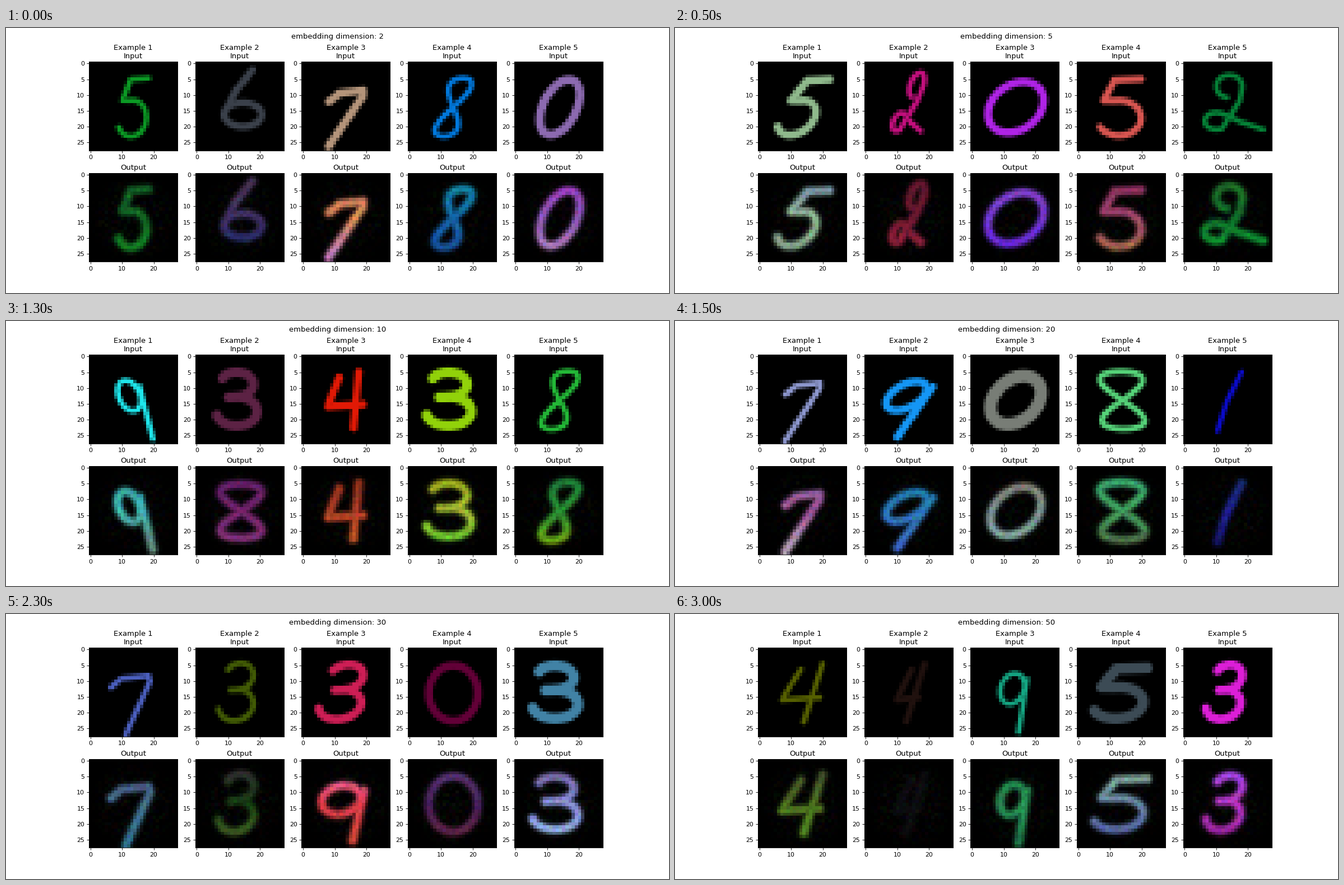
A matplotlib script for the animation above (3500 ms loop, 1183 px wide and 473 px high).

```python
import numpy as np
import matplotlib.pyplot as plt
from matplotlib.animation import FuncAnimation
from matplotlib.colors import to_rgb

WIDTH, HEIGHT, DPI = 1183, 473, 79
SIZE = 28
CENTRE = 13.8
ROWS, COLS = np.mgrid[:SIZE, :SIZE]


def arc(cx, cy, rx, ry, start, end):
    """Elliptic arc, angles in degrees, clockwise from the right."""
    t = np.radians(np.linspace(start, end, 50))
    return np.column_stack([cx + rx * np.cos(t), cy + ry * np.sin(t)])


def path(*pieces):
    """Join points and arcs, then sample the line at even steps."""
    p = np.vstack(pieces)
    run = np.r_[0, np.cumsum(np.hypot(*np.diff(p, axis=0).T))]
    s = np.linspace(0, run[-1], int(80 * run[-1]) + 2)
    return np.column_stack([np.interp(s, run, p[:, 0]), np.interp(s, run, p[:, 1])])


def figure_eight():
    t = np.linspace(0, 2 * np.pi, 120)
    return np.column_stack([0.5 + 0.5 * np.sin(2 * t), 0.5 - 0.5 * np.cos(t)])


# Pen strokes of each digit in a unit box, y downwards.
GLYPHS = {
    "0": [path(arc(.5, .5, .5, .5, -90, 270))],
    "1": [path((1, 0), (.4, .5), (0, 1))],
    "2": [path(arc(.42, .2, .22, .2, 100, 370), (.6, .45),
               arc(.2, .81, .2, .15, 60, 300), (.6, .82), (1, .96))],
    "3": [path(arc(.5, .23, .4, .23, -150, 90)),
          path((.3, .47), arc(.5, .73, .5, .27, -80, 165))],
    "4": [path((.3, .1), (.12, .4), (0, .62), (1, .58)),
          path((.85, 0), (.75, 1))],
    "5": [path((1, .03), (.4, .05), (.15, .4), arc(.5, .7, .5, .3, -100, 150))],
    "6": [path((.75, 0), (.3, .38), arc(.5, .79, .5, .21, 190, -190))],
    "7": [path((0, .2), (.25, .05), (.95, 0), (1, .1), (.45, 1))],
    "8": [path(figure_eight())],
    "9": [path(arc(.45, .26, .45, .26, 0, -360), (.95, .1), (.95, 1))],
}


def distance(digit, aspect, slant, weight):
    """Pixel distances to a digit scaled to a 20 pixel box, centred by mass."""
    p = np.vstack(GLYPHS[digit]) * [aspect, 1]
    p[:, 0] -= slant * p[:, 1]
    p *= (20 - 2 * weight) / np.ptp(p, axis=0).max()
    p += CENTRE - p.mean(axis=0)
    return np.hypot(COLS[..., None] - p[:, 0], ROWS[..., None] - p[:, 1]).min(-1)


def sharp(d, weight, colour):
    return np.clip(weight + 0.5 - d, 0, 1)[..., None] * np.array(to_rgb("#" + colour))


def blurred(d, shades, rng):
    """Soft stroke with a downward colour gradient and faint speckle."""
    rgb = np.array([to_rgb("#" + s) for s in shades])
    stops = np.linspace(4, 24, len(rgb))
    hue = np.stack([np.interp(ROWS, stops, c) for c in rgb.T], -1)
    img = np.exp(-(d / 1.55) ** 2.6)[..., None] * hue
    img *= rng.normal(1, 0.06, img.shape)
    window = np.exp(-(np.hypot(COLS - 14, ROWS - 14) / 12.5) ** 6)
    img += 0.06 * rng.random(img.shape) ** 4 * window[..., None]
    return np.clip(img, 0, 1)


def scene(dim, *cells):
    """Cells hold: digit (or input>output), aspect, slant, weight, ink, output shades."""
    rng = np.random.default_rng(dim)
    top, bottom = [], []
    for digit, aspect, slant, weight, ink, shades in cells:
        d = distance(digit[0], aspect, slant, weight)
        top.append(sharp(d, weight, ink))
        d = distance(digit[-1], aspect, slant, weight)
        bottom.append(blurred(d, shades.split(), rng))
    return f"embedding dimension: {dim}", top + bottom


SCENES = [
    scene(2,
          ("5", .48, .05, .85, "0b9a24", "0f5a22 0f6420 108020"),
          ("6", .66, 0, 1.15, "3a404a", "443050 382c60 202c6c"),
          ("7", .57, .33, 1.25, "b4947a", "d27060 d88a50 c07cb0"),
          ("8", .38, .33, .85, "0078dc", "0f82a0 1064a8 144c98"),
          ("0", .65, .33, 1.35, "8c6ab0", "a03cc0 8858b8 b078b4")),
    scene(5,
          ("5", .62, .39, 1.25, "8fb98c", "7890a0 90b890 809c88"),
          ("2", .5, .3, .85, "c30f7d", "60142c 701830 98203c"),
          ("0", 1.06, .3, 1.25, "af23e6", "8040d0 7034d0 6420dc"),
          ("5", .75, 0, 1.1, "d75550", "8c3060 a04068 a46a48"),
          ("2", 1.03, 0, .85, "058237", "1c6c24 0c6c28 0c9c30")),
    scene(10,
          ("9", .42, -.26, .85, "1ee6eb", "34a4a8 3cb0b0 608c80"),
          ("3>8", .76, 0, 1.55, "5c2244", "601c64 702068 803074"),
          ("4", .62, .03, 1.2, "e11905", "8c3018 b03c22 c05820"),
          ("3", .85, 0, 1.6, "91d20a", "98ac18 a0b830 5cc428"),
          ("8", .42, .28, .85, "23b937", "1c7834 248c30 6ca010")),
    scene(20,
          ("7", .55, .32, .9, "8c96cd", "8c60a0 a05098 b498b4"),
          ("9", .7, .7, 1.25, "1496f5", "1878a8 2878b8 3868c0"),
          ("0", 1, .33, 2.05, "787d76", "80786c 789490 80a4a0"),
          ("8", .74, -.05, .95, "55d278", "34a46c 3c9c58 4c6c44"),
          ("1", .41, 0, .8, "0a0ac8", "14286c 1c1c94 10105c")),
    scene(30,
          ("7", .66, .05, .85, "4b5fbe", "445480 406c88 307090"),
          ("3", .6, .12, .95, "415a05", "2c2c2c 143c10 3c5c20"),
          ("3>9", .76, .23, 1.35, "cd1e55", "ec60a0 dc3848 cc4838"),
          ("0", .88, 0, 1.3, "620037", "54306c 441c58 602040"),
          ("3", .87, 0, 1.7, "4182a5", "7464a0 8490dc 90b0e4")),
    scene(40,
          ("9", .67, .47, 1, "73afa0", "309c88 3c90a0 5c5090"),
          ("6", .55, .2, 1.2, "82d70f", "78880c 8c9c08 788c0c"),
          ("4", .62, .12, 1.3, "ebaae6", "c49494 b898b0 c494c0"),
          ("1", .32, 0, 1, "0505a5", "1c1c88 24249c 181870"),
          ("6", .42, .15, 1.1, "789b9b", "606858 647060 80706c")),
    scene(50,
          ("4", .63, .26, .85, "555f00", "3c4c28 4c701c 508820"),
          ("4", .36, .28, 1, "20110e", "0a0a0d 0a0a0d"),
          ("9", .45, .16, .8, "14a582", "1c7c48 248c50 1c7848"),
          ("5", .98, .12, 1.7, "3c4b55", "80a490 6080a0 5060a0"),
          ("3", .62, .18, 1.4, "dc1ed7", "a040e0 b030c0 9c209c")),
]

# The tiny margin keeps rounding from dropping a pixel.
fig, axes = plt.subplots(2, 5, dpi=DPI,
                         figsize=((WIDTH + 1e-6) / DPI, (HEIGHT + 1e-6) / DPI))
heading = fig.suptitle("")
panels = []
for k, ax in enumerate(axes.flat):
    ax.set_title(f"Example {k + 1}\nInput" if k < 5 else "Output")
    panels.append(ax.imshow(np.zeros((SIZE, SIZE, 3))))


def update(i):
    title, images = SCENES[i]
    heading.set_text(title)
    for panel, img in zip(panels, images):
        panel.set_data(img)
    return panels


anim = FuncAnimation(fig, update, frames=len(SCENES), interval=500, repeat=True, repeat_delay=0)
plt.show()
```
